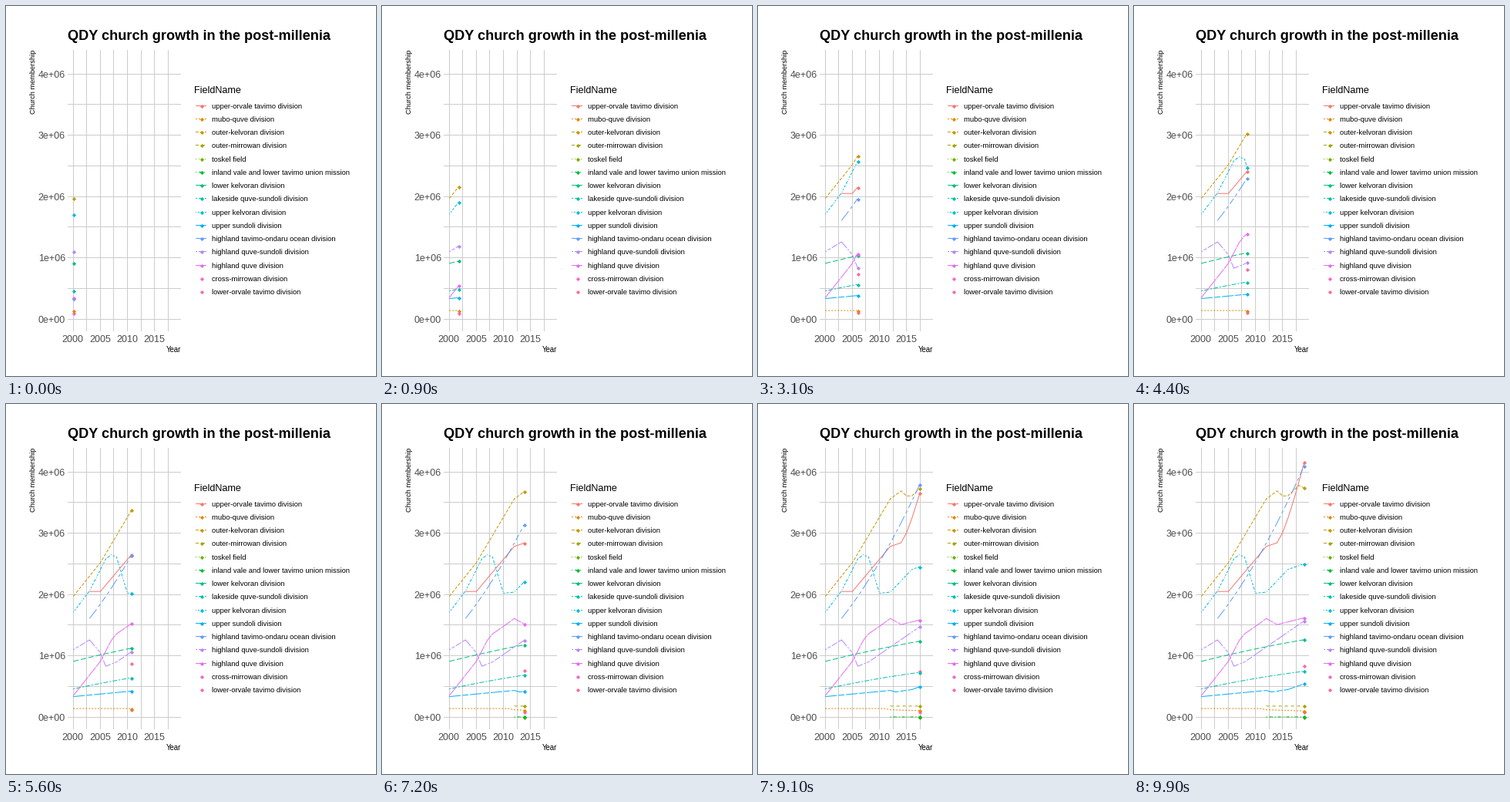
Write a matplotlib script that moves like this. It is 480 by 480 pixels and loops after 10000 ms.

```python
import numpy as np
import matplotlib.pyplot as plt
from matplotlib.animation import FuncAnimation

plt.rcParams["font.family"] = "Liberation Sans"

SIZE, DPI = 480, 72          # at 72 dpi one point equals one pixel
FRAMES, INTERVAL = 100, 100
FIRST, SPAN = 2000, 19
LEFT, RIGHT, TOP, BOTTOM = 80, 227, 57, 422
GRID, TICK = "#cccccc", "#4d4d4d"


def px(t):
    return 87.3 + t * 7.025


def py(millions):
    return 406.2 - millions * 79.5


def path(*keys):
    """Straight segments through a few (years, millions) key points."""
    return lambda t: np.interp(t, *zip(*keys))


# name, colour, dash pattern (hex digits, "" = solid, None = no line),
# first year since 2000, membership in millions as a function of time
SERIES = [
    ("upper-orvale tavimo division", "#F8766D", "", 3,
     lambda t: 2.05 + .105 * np.clip(t - 5, 0, 7) + .03 * np.maximum(t - 12, 0)
     + .134 * np.maximum(t - 14, 0) ** 1.345),
    ("mubo-quve division", "#E58700", "22", 0, path((11, .14), (12, .12), (19, .10))),
    ("outer-kelvoran division", "#C99800", "42", 0,
     path((0, 1.97), (5, 2.52), (12, 3.56), (14, 3.69), (15, 3.61), (16, 3.61),
          (18, 3.78), (19, 3.74))),
    ("outer-mirrowan division", "#A3A500", "44", 12, lambda t: .18 + 0 * t),
    ("toskel field", "#6BB100", "13", 12, lambda t: .001 + 0 * t),
    ("inland vale and lower tavimo union mission", "#00BA38", "1343", 12,
     lambda t: .003 + 0 * t),
    ("lower kelvoran division", "#00BF7D", "73", 0,
     lambda t: .91 + .022 * t - .00018 * t ** 2),
    ("lakeside quve-sundoli division", "#00C0AF", "2262", 0,
     lambda t: .46 + .019 * t - .0002 * t ** 2),
    ("upper kelvoran division", "#00BCD8", "12223242", 0,
     path((0, 1.71), (3, 2.06), (6, 2.58), (7, 2.65), (8, 2.61), (10, 2.02),
          (12, 2.04), (16, 2.41), (19, 2.5))),
    ("upper sundoli division", "#00B0F6", "F282", 0,
     path((0, .335), (12, .435), (13, .41), (16, .45), (19, .545))),
    ("highland tavimo-ondaru ocean division", "#619CFF", "F4448444", 3,
     lambda t: 1.61 + .112 * (t - 3) + .00273 * (t - 3) ** 2),
    ("highland quve-sundoli division", "#B983FF", "224282F2", 0,
     path((0, 1.1), (3, 1.26), (5, 1.05), (6, .83), (8, .9), (19, 1.57))),
    ("highland quve division", "#E76BF3", "F1", 0,
     path((0, .35), (5, .91), (7, 1.25), (8, 1.36), (10, 1.48), (12, 1.61),
          (14, 1.51), (19, 1.62))),
    ("cross-mirrowan division", "#FD61D1", None, 0,
     path((0, .095), (11, .12), (12, .085), (19, .09))),
    ("lower-orvale tavimo division", "#FF67A4", None, 3,
     path((3, .66), (11, .885), (16, .67), (19, .84))),
]

fig = plt.figure(figsize=(SIZE / DPI, SIZE / DPI), dpi=DPI, facecolor="white")
ax = fig.add_axes([0, 0, 1, 1])
ax.set(xlim=(0, SIZE), ylim=(SIZE, 0))
ax.axis("off")


def label(x, y, text, size, color="black", **kw):
    ax.text(x, y, text, fontsize=size, color=color, va="baseline", **kw)


def rule(x, y):
    ax.plot(x, y, color=GRID, lw=1, snap=False, solid_capstyle="butt", zorder=1)


def stroke(color, dash, x=(), y=()):
    style = (0, [int(d, 16) for d in dash]) if dash else "-"
    return ax.plot(x, y, color=color, lw=1, ls=style, snap=False,
                   solid_capstyle="butt", dash_capstyle="butt", zorder=2)[0]


def dot(color, zorder=4, x=(), y=()):
    return ax.plot(x, y, "D", color=color, ms=3.7, mew=0, snap=False,
                   zorder=zorder)[0]


def centre(v):
    """Middle of the pixel that holds v."""
    return np.floor(v) + .5


def draw_axes():
    for v in np.arange(0, 4.1, 0.5):
        rule([LEFT, RIGHT], [centre(py(v))] * 2)
    for t in np.arange(0, SPAN, 2.5):
        rule([centre(px(t))] * 2, [TOP, BOTTOM])
    for v in range(5):
        label(77, py(v) + 4.4, f"{v}e+{'06' if v else '00'}", 12.5, TICK, ha="right")
    for t in range(0, SPAN, 5):
        label(px(t) - .6, 436.5, str(FIRST + t), 12.5, TICK, ha="center")
    label(80, 44, "QDY church growth in the post-millenia", 18.1, weight="bold")
    label(227.5, 449, "Year", 9.6, ha="right")
    label(38, 57, "Church membership", 9.2, ha="right", rotation=90,
          rotation_mode="anchor")


def draw_legend():
    label(244, 113, "FieldName", 12.6)
    for i, (name, color, dash, *_) in enumerate(SERIES):
        y = centre(129.2 + 17.25 * i)
        if dash is not None:
            stroke(color, dash, [246, 260], [y, y])
        dot(color, 4, [253.5], [y])
        label(267, y + 3.3, name, 9.4)


draw_axes()
draw_legend()

lines = [stroke(color, dash or "") for _, color, dash, *_ in SERIES]
dots = [dot(color, 3 if dash is None else 4) for _, color, dash, *_ in SERIES]


def update(i):
    now = SPAN * i / (FRAMES - 1)
    for (_, _, dash, start, value), line, point in zip(SERIES, lines, dots):
        if now < start:
            line.set_data([], [])
            point.set_data([], [])
            continue
        t = np.append(np.arange(start, now), now)
        x, y = px(t), py(value(t))
        if dash is not None:
            line.set_data(x, y)
        point.set_data(centre(x[-1:]), centre(y[-1:]))
    return lines + dots


anim = FuncAnimation(fig, update, frames=FRAMES, interval=INTERVAL,
                     repeat=True, repeat_delay=0, blit=False)
plt.show()
```
